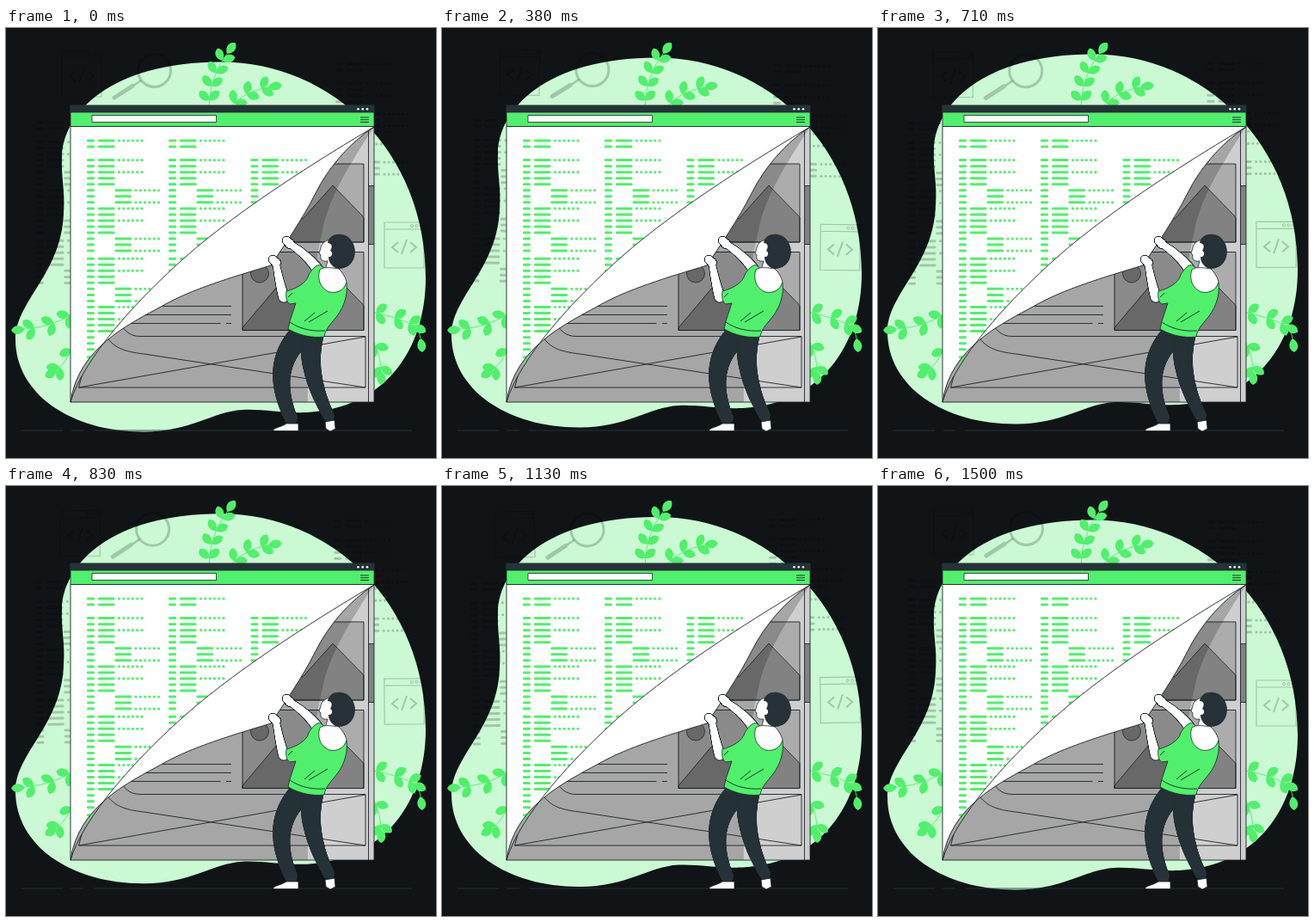
Write an HTML page with a canvas that moves like this. It is 500 px wide and 500 px high and loops after 1.54 s.

```html
<!DOCTYPE html>
<html lang="en">
<head>
<meta charset="utf-8">
<title>Page peel</title>
<style>
html, body { margin: 0; width: 100%; height: 100%; overflow: hidden; background: #101417; }
canvas { display: block; width: 500px; height: 500px; }
</style>
</head>
<body>
<canvas id="stage" width="500" height="500"></canvas>
<script>
const ctx = document.getElementById('stage').getContext('2d');
const GREEN = '#50f06c', PALE = '#caf9d3', INK = '#263238', NIGHT = '#101417';
const FAINT = 'rgba(0,0,0,.2)', LINE = '#1b2327';
const LOOP = 1540, PERIOD = 1500, LEAD = 60, FPS = 24;

function fill(d, color) {
  ctx.fillStyle = color;
  ctx.fill(new Path2D(d));
}

function stroke(d, color = LINE, width = .9) {
  ctx.strokeStyle = color;
  ctx.lineWidth = width;
  ctx.stroke(new Path2D(d));
}

function shape(d, color) {
  fill(d, color);
  stroke(d, LINE, .8);
}

function box(x, y, w, h, color) {
  ctx.fillStyle = color;
  ctx.fillRect(x, y, w, h);
}

function dot(x, y, r, color) {
  ctx.fillStyle = color;
  ctx.beginPath();
  ctx.arc(x, y, r, 0, Math.PI * 2);
  ctx.fill();
}

function circle(x, y, r, color, width) {
  ctx.strokeStyle = color;
  ctx.lineWidth = width;
  ctx.beginPath();
  ctx.arc(x, y, r, 0, Math.PI * 2);
  ctx.stroke();
}

// Point and heading on a quadratic curve from a to b with handle c
function along([ax, ay], [cx, cy], [bx, by], t) {
  const u = 1 - t;
  return {
    x: u * u * ax + 2 * u * t * cx + t * t * bx,
    y: u * u * ay + 2 * u * t * cy + t * t * by,
    angle: Math.atan2(u * (cy - ay) + t * (by - cy), u * (cx - ax) + t * (bx - cx))
  };
}

function leaf({ x, y, angle }, turn, size) {
  ctx.save();
  ctx.translate(x, y);
  ctx.rotate(angle + turn);
  ctx.scale(size, size);
  fill('M0 0C.3 -.46 .85 -.42 1 0C.75 .4 .3 .36 0 0Z', GREEN);
  ctx.restore();
}

// A stem with leaf pairs at even steps and one leaf on the tip
function plant(a, c, b, pairs) {
  stroke(`M${a}Q${c} ${b}`, GREEN);
  for (let i = 0; i < pairs; i++) {
    const node = along(a, c, b, .1 + .75 * i / (pairs - 1));
    leaf(node, -.9, 15.5);
    leaf(node, .75, 15.5);
  }
  leaf(along(a, c, b, 1), 0, 16);
}

function plants() {
  plant([236, 91], [237, 56], [257, 30], 4);
  plant([262, 91], [278, 73], [305, 69], 3);
  plant([78, 331], [58, 347], [22, 350], 3);
  plant([78, 370], [70, 390], [59, 397], 2);
  plant([424, 330], [458, 337], [474, 346], 3);
  plant([474, 346], [481, 352], [482, 361], 0);
  plant([428, 366], [436, 382], [436, 399], 2);
}

// Rows of number, word and sometimes a dotted tail
function codeRow(x, y, indent, dotted, color) {
  const start = x + (indent ? 32.5 : 13);
  ctx.fillStyle = color;
  ctx.beginPath();
  ctx.roundRect(x, y - 1.5, 9, 3, 1.3);
  ctx.roundRect(start, y - 1.5, 19.5, 3, 1.3);
  ctx.fill();
  for (let i = 0; dotted && i < 6; i++) dot(start + 24.5 + i * 5.3, y, 1.6, color);
}

function listing(x, y, blocks, color, heading = true) {
  if (heading) {
    codeRow(x, y, false, true, color);
    codeRow(x, y + 7, false, false, color);
  }
  for (let row = 0; row < blocks * 8; row++) {
    const block = Math.floor(row / 8), r = row % 8;
    const top = y + 22.6 + block * 57.3 - block % 2;
    codeRow(x, top + r * 7.03, r > 4, [0, 2, 5, 7].includes(r), color);
  }
}

function codeWindow(x, y) {
  ctx.save();
  ctx.translate(x, y);
  stroke('M0 0H46V53H0ZM0 8H46', FAINT, 1.2);
  for (let i = 0; i < 3; i++) circle(32 + i * 5.5, 4, 1.5, FAINT, 1);
  stroke('M16 23L9 29L16 35M30 23L37 29L30 35M26 20L20 37', FAINT, 2);
  ctx.restore();
}

function backdrop() {
  codeWindow(65, 27);
  codeWindow(440, 226);
  circle(172.5, 49.5, 19, FAINT, 3);
  stroke('M157 61L149 66.5', FAINT, 2.5);
  ctx.lineCap = 'round';
  stroke('M147 67.5L126 81', FAINT, 5);
  ctx.lineCap = 'butt';
  listing(35, 110, 3, FAINT);
  listing(383, 42, 2, FAINT);
}

const blob = 'M250 39.5C380 39.5 488 145 488 290C488 375 440 442 350 447' +
  'C320 448 300 443 275 444C240 446 215 469.5 160 469.5C75 469.5 11 425 11 362' +
  'C11 318 65 285 67 215C69 190 64 175 65 150C66 100 120 39.5 250 39.5Z';
const peelTop = 'M428 115C372 148 275 208 210 265C150 318 90 385 75 435';
const peelEdge = 'C400 133 375 162 360 192C345 222 322 255 308 276' +
  'C262 290 215 304 182 323C142 345 84 372 75 435';

function picture(y) {
  ctx.save();
  ctx.translate(275, y);
  box(0, 0, 141, 91, '#acacac');
  shape('M0 88L43 37L70 64L105 25L141 62V91H0Z', '#828282');
  dot(20, 25, 10.5, '#828282');
  circle(20, 25, 10.5, LINE, .7);
  stroke('M0 0H141V91H0Z');
  ctx.restore();
}

function wireframe() {
  box(75, 114.5, 353, 320.5, '#cfcfcf');
  picture(158);
  picture(260.5);
  box(421.5, 183.5, 6.5, 68, '#828282');
  fill('M428 115C395 165 375 200 368 235C358 280 351 330 351 435H75V114Z', FAINT);
  stroke('M421.5 115V435M421.5 183.5H428M421.5 251.5H428');
  stroke('M150 323.5H262M140 333.5H262M130 343.5H249.5M256 343.5H262');
  stroke('M132 343C138 352 144 358.5 156 358.5H418V418H84.5L88 405M84.5 418L418 359');
  stroke('M116 358C126 372 136 376 160 379L418 418');
}

function browser() {
  wireframe();
  fill('M75 114.5H428V115' + peelEdge + 'Z', '#fff');

  ctx.save();
  ctx.clip(new Path2D(peelTop + 'V114H428Z'));
  listing(94, 131, 5, GREEN);
  listing(189, 131, 3, GREEN);
  listing(284.5, 131, 2, GREEN, false);
  ctx.restore();

  stroke(peelTop);
  stroke('M428 115' + peelEdge);
  stroke('M75 114.5H428V435H75Z');
  box(74.5, 89.5, 354, 9, INK);
  shape('M75 98V114.5H428V98Z', GREEN);
  shape('M100 101.5H244.5V109.5H100Z', '#fff');
  for (let i = 0; i < 3; i++) {
    dot(409.5 + i * 5.25, 94.2, 1.3, '#fff');
    box(412, 103.5 + i * 2.8, 10, .9, LINE);
  }
}

// Tapering limb from a to b, bent towards c
function limb(a, c, b, from, to, color) {
  for (let t = 0; t <= 1; t += .01) {
    const p = along(a, c, b, t);
    dot(p.x, p.y, from + (to - from) * t, color);
  }
}

function arm(shoulder, bend, hand) {
  for (const [grow, color] of [[.5, LINE], [-.4, '#fff']]) {
    limb(shoulder, bend, hand, 6 + grow, 3.7 + grow, color);
    limb(hand, hand, [hand[0] - 4, hand[1] - 4], 5 + grow, 4.5 + grow, color);
  }
}

function person() {
  limb([341, 359], [305, 396], [332, 455], 13.5, 7.5, INK);
  limb([356, 359], [349, 402], [376, 452], 13, 6.5, INK);
  shape('M326 460H340V468.5H311C310 465 318 465 326 460Z', '#fff');
  shape('M371 458L382 456L383 466L377 469L372 466Z', '#fff');

  arm([362, 280], [350, 264], [330, 251]);
  shape('M379 246C371 246 366 252 366 256L364 262L366 264C365 269 368 272 374 271L371 282L385 286L392 268Z', '#fff');
  fill('M374 250C375 242 383 239 390 240C400 241 406 251 406 261C405 274 396 280 387 280' +
       'C380 279 375 273 375 266C379 267 381 261 377 259C380 254 379 250 374 250Z', INK);
  arm([323, 313], [318, 297], [314, 273]);

  shape('M352 287C356 280 362 274 366 276L372 281L366 290C372 306 386 308 396 296' +
        'C398 312 392 328 380 341C374 348 371 353 370 359C356 361 340 357 328 350L330 341L337 320' +
        'L330 321C326 319 325 312 326 306C338 303 350 296 352 287Z', GREEN);
  shape('M365 281C362 290 364 302 376 307C386 309 394 304 396 295C394 288 390 283 387 280C380 279 370 277 365 281Z', '#fff');
  stroke('M330 342C342 350 355 353 371 352M347 341L359 331M352 342L374 329M328 313L333 308');
}

// Triangle wave: 0, 1, 0, -1 over one unit
function swing(phase) {
  return 1 - 4 * Math.abs(((phase + .25) % 1 + 1) % 1 - .5);
}

const phase = ms => (ms + LEAD) / PERIOD;
const lift = ms => 5 * swing(phase(ms) - .25);
const tilt = ms => swing(phase(ms)) * Math.PI / 180;

function draw(ms) {
  box(0, 0, 500, 500, NIGHT);

  ctx.save();
  ctx.translate(0, lift(0) - lift(ms));
  fill(blob, PALE);
  ctx.restore();

  stroke('M18 468H66M75.5 468H90M101 468H472', INK);

  ctx.save();
  ctx.translate(250, 250);
  ctx.rotate(tilt(ms) - tilt(0));
  ctx.translate(-250, -250);
  backdrop();
  ctx.restore();

  plants();
  browser();
  person();
}

function tick() {
  const step = Math.floor((performance.now() % LOOP) * FPS / 1000 + .1);
  draw(Math.min(step, 36) * 1000 / FPS);
  requestAnimationFrame(tick);
}
tick();
</script>
</body>
</html>
```
